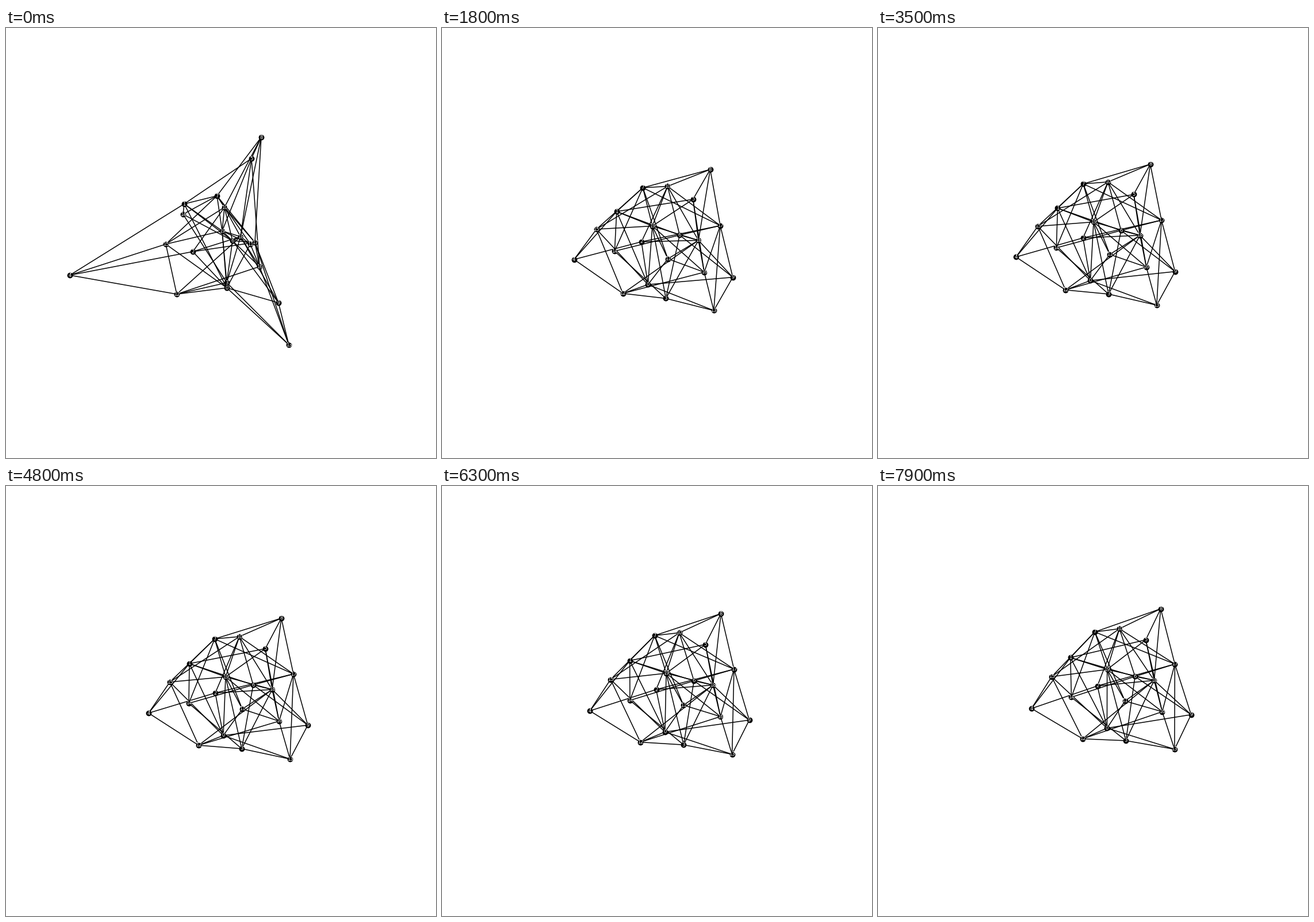
A matplotlib script that plays this animation: 748 by 748 pixels, repeating every 8000 ms.

```python
import numpy as np
import matplotlib.pyplot as plt
from matplotlib.animation import FuncAnimation
from matplotlib.collections import LineCollection

SIZE, DPI = 748, 100
FRAMES, STEP = 80, 100

SNAP = 0.22            # s, time constant of the first contraction
REST_TIME = 4.8        # s, when the graph passes through its rest shape
DRIFT = 5.7 - 4.4j     # px/s, shift of the whole graph
SPIN = -0.012j         # rad/s, slow counterclockwise turn

LINKS = {
    0: [1, 2, 9, 11, 12, 13, 15, 19],
    1: [4, 5, 6, 7, 14, 19],
    2: [4, 10, 17, 18],
    3: [6, 12, 13, 14, 18, 19],
    4: [12, 15],
    5: [8, 16, 18, 19],
    6: [9, 10, 14, 17, 18],
    7: [8, 10, 11, 14, 15, 17, 19],
    8: [10, 17, 18],
    9: [13, 17, 18],
    10: [15, 17, 18, 19],
    11: [16, 18, 19],
    12: [15, 16, 18],
    13: [16, 17],
    15: [19],
    16: [17, 18, 19],
    18: [19],
}
EDGES = np.array([(a, b) for a, ends in LINKS.items() for b in ends])

# Nodes as complex numbers x + iy: tangled at the start, and at rest
START = np.array([
    384+452j, 310+306j, 325+389j, 384+443j, 111+430j,
    427+227j, 394+370j, 367+292j, 444+190j, 474+478j,
    380+312j, 425+376j, 297+463j, 492+551j, 308+324j,
    278+376j, 441+415j, 433+373j, 408+363j, 376+353j])
REST = np.array([
    378+434j, 319+309j, 364+360j, 410+457j, 248+395j,
    451+283j, 430+346j, 363+266j, 479+230j, 525+416j,
    406+262j, 411+388j, 335+451j, 494+475j, 318+378j,
    285+341j, 475+409j, 500+327j, 463+354j, 382+332j])
CENTER = REST.mean()


def settled(t):
    """Rest shape carried along by the drift and the turn."""
    dt = t - REST_TIME
    return CENTER + DRIFT * dt + (REST - CENTER) * np.exp(SPIN * dt)


def layout(t):
    z = settled(t) + (START - settled(0)) * np.exp(-t / SNAP)
    return np.column_stack([z.real, z.imag])


fig = plt.figure(figsize=(SIZE / DPI, SIZE / DPI), dpi=DPI, facecolor="white")
ax = fig.add_axes([0, 0, 1, 1])
ax.set(xlim=(0, SIZE), ylim=(SIZE, 0))
ax.axis("off")

first = layout(0)
lines = LineCollection(first[EDGES], colors="black", linewidths=1.1, zorder=1)
ax.add_collection(lines)
dots = ax.scatter(*first.T, s=50, c="black", linewidths=0, zorder=2)
labels = [ax.text(x, y, str(i), color="white", fontsize=6, ha="center",
                  va="center", family="DejaVu Sans", zorder=3)
          for i, (x, y) in enumerate(first)]


def draw(frame):
    pos = layout(frame * STEP / 1000)
    lines.set_segments(pos[EDGES])
    dots.set_offsets(pos)
    for label, p in zip(labels, pos):
        label.set_position(p)
    return [lines, dots, *labels]


anim = FuncAnimation(fig, draw, frames=FRAMES, interval=STEP,
                     repeat=True, repeat_delay=0)
plt.show()
```
